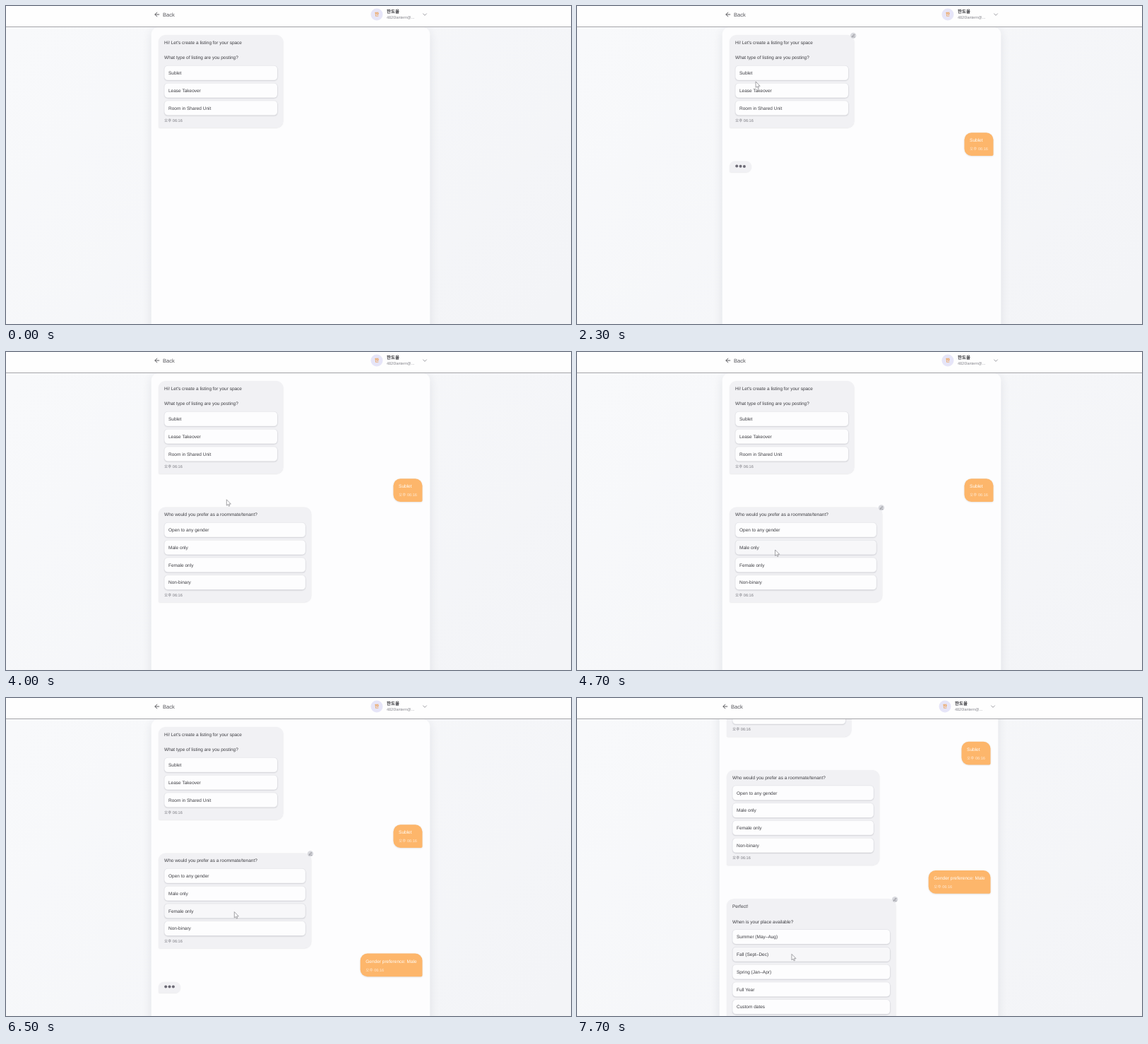
Animation of 800 by 450 pixels, one loop 8 s. Source, as an HTML page with a canvas:

```html
<!DOCTYPE html>
<html lang="en">
<head>
<meta charset="utf-8">
<title>Listing chat</title>
<style>
  html, body { margin: 0; width: 100%; height: 100%; overflow: hidden; background: #f7f8fa; }
  canvas { display: block; }
</style>
</head>
<body>
<canvas id="stage" width="800" height="450"></canvas>
<script>
const ctx = document.getElementById('stage').getContext('2d');
const LOOP = 8000, STEP = 100;
const FONT = '"Liberation Sans", "Noto Sans CJK KR", "Noto Sans CJK", sans-serif';
const STAMP = '오후 06:16';
const OPTION_PITCH = 24.8, OPTION_HEIGHT = 21;
const SCROLL_AT = 6600;

const questions = [
  { from: 0, y: 41, right: 392.5, lines: ["Hi! Let's create a listing for your space", 'What type of listing are you posting?'],
    options: ['Sublet', 'Lease Takeover', 'Room in Shared Unit'] },
  { from: 3800, y: 219.5, right: 432.3, lines: ['Who would you prefer as a roommate/tenant?'],
    options: ['Open to any gender', 'Male only', 'Female only', 'Non-binary'] },
  { from: 6600, y: 401.7, right: 455.5, lines: ['Perfect!', 'When is your place available?'],
    options: ['Summer (May–Aug)', 'Fall (Sept–Dec)', 'Spring (Jan–Apr)', 'Full Year', 'Custom dates'] }
];
for (const q of questions) {
  q.firstOption = q.y + 10.5 + (q.lines.length - 1) * 21.5 + 21.7;
  q.stampY = q.firstOption + (q.options.length - 1) * OPTION_PITCH + 17.6;
  q.bottom = q.stampY + 10.5;
}
const answers = [
  { from: 2100, until: 3800, x: 548.5, y: 179.2, text: 'Sublet' },
  { from: 4900, until: 6600, x: 501.7, y: 361.5, text: 'Gender preference: Male' }
];

// Pointer stops: time, x, y
const pointerPath = [
  [1500, 334.8, 128.8], [1900, 244, 92], [2100, 244, 92], [2900, 302, 190.5], [3400, 312.3, 209.2],
  [4100, 312.3, 209.2], [4500, 283, 286], [4700, 280.6, 280.4], [4900, 280.6, 280.4],
  [5700, 323.3, 303], [6800, 323.3, 303], [7700, 304, 362.8]
];

function pointerAt(t) {
  if (t < pointerPath[0][0]) return null;
  const i = pointerPath.findIndex(p => p[0] > t);
  if (i < 0) return pointerPath[pointerPath.length - 1].slice(1);
  const [t0, x0, y0] = pointerPath[i - 1], [t1, x1, y1] = pointerPath[i];
  const u = (t - t0) / (t1 - t0), k = u * u * (3 - 2 * u);
  return [x0 + (x1 - x0) * k, y0 + (y1 - y0) * k];
}

function text(str, x, middle, size, color, weight = 400, align = 'left') {
  ctx.font = `${weight} ${size}px ${FONT}`;
  ctx.textAlign = align;
  ctx.fillStyle = color;
  ctx.fillText(str, x, middle + size * 0.36);
}

function box(x, y, right, bottom, radii, fill, shadow) {
  ctx.save();
  if (shadow) [ctx.shadowColor, ctx.shadowBlur, ctx.shadowOffsetY] = shadow;
  ctx.beginPath();
  ctx.roundRect(x, y, right - x, bottom - y, radii);
  ctx.fillStyle = fill;
  ctx.fill();
  ctx.restore();
}

function disc(x, y, r, fill) {
  ctx.beginPath();
  ctx.arc(x, y, r, 0, Math.PI * 2);
  ctx.fillStyle = fill;
  ctx.fill();
}

function stroke(path, color, width) {
  ctx.strokeStyle = color;
  ctx.lineWidth = width;
  ctx.lineCap = ctx.lineJoin = 'round';
  ctx.stroke(new Path2D(path));
}

function editBadge(x, y, alpha) {
  ctx.save();
  ctx.globalAlpha = alpha;
  ctx.translate(x, y);
  disc(0, 0, 4.2, '#d9dadf');
  stroke('M-1.8 1.8 L-1.4 .5 L1.1 -2 L2 -1.1 L-.5 1.4 Z M.5 2H2', '#77777e', 0.6);
  ctx.restore();
}

function drawQuestion(q, pointer, t) {
  const inside = (x, y, right, bottom) => pointer &&
    pointer[0] >= x && pointer[0] <= right && pointer[1] >= y && pointer[1] <= bottom;
  box(216, q.y, q.right, q.bottom, [10, 10, 10, 2], '#f1f1f4', ['rgba(30,30,50,.1)', 1.5, 0.5]);
  q.lines.forEach((line, i) => text(line, 224, q.y + 10.5 + i * 21.5, 6.5, '#3d3d42'));
  q.options.forEach((label, i) => {
    const mid = q.firstOption + i * OPTION_PITCH;
    const top = mid - OPTION_HEIGHT / 2, bottom = top + OPTION_HEIGHT, right = q.right - 8;
    const hover = inside(224, top, right, bottom);
    box(224, top, right, bottom, 5, hover ? '#dcdde2' : '#e3e4e8', ['rgba(30,30,50,.16)', 1.5, 0.8]);
    box(224.5, top + 0.5, right - 0.5, bottom - 0.5, 4.5, hover ? '#f7f7f9' : '#fdfdfe');
    text(label, 230, mid, 6.5, '#3d3d42');
  });
  text(STAMP, 224, q.stampY, 5.6, '#7b7b82');
  if (inside(216, q.y, q.right, q.bottom)) editBadge(q.right - 1.3, q.y + 0.9, t < 1600 ? 0.7 : 1);
}

function drawAnswer(a, t) {
  box(a.x, a.y, 589.5, a.y + 32.8, [10, 10, 2, 10], '#fdb66b', ['rgba(60,40,20,.16)', 2, 0.6]);
  text(a.text, a.x + 7.6, a.y + 10.7, 6.5, '#fffdfa');
  text(STAMP, a.x + 7.6, a.y + 23.2, 5.6, 'rgba(255,255,255,.7)');
  if (t >= a.until) return;
  const top = a.y + 40.3;
  box(216, top, 247, top + 15.7, [8, 8, 8, 2], '#f1f1f4', ['rgba(30,30,50,.1)', 1.5, 0.5]);
  for (let i = 0; i < 3; i++) {
    const lift = 0.8 * Math.abs(Math.sin(((t - a.from) / 1000 - i * 0.1) * Math.PI));
    disc(226.2 + i * 5.35, top + 7.4 - lift, 2, '#6c6a75');
  }
}

function drawHeader() {
  ctx.fillStyle = '#fefefe';
  ctx.fillRect(-10, 0, 820, 29);
  ctx.fillStyle = '#a5a5a9';
  ctx.fillRect(-10, 29, 820, 1);
  stroke('M216.8 12H211 M213.8 9.1L210.9 12L213.8 14.9', '#4b4b50', 0.9);
  text('Back', 222, 11.9, 7.6, '#55555b');
  disc(525, 12, 8.5, '#e6e5f8');
  text('한', 525, 12, 6.6, '#ee9d4c', 600, 'center');
  text('한도율', 539, 7.9, 6.5, '#333338', 600);
  text('4820lantern@...', 539, 16.2, 5.5, '#85858c');
  stroke('M590.6 10.9L593 13.3L595.4 10.9', '#85858c', 0.8);
}

function drawPointer([x, y]) {
  ctx.save();
  ctx.translate(x, y);
  const arrow = 'M0 0V8L1.9 6.4L3.2 9.1L4.5 8.5L3.3 5.9H5.7Z';
  ctx.fillStyle = '#fff';
  ctx.fill(new Path2D(arrow));
  stroke(arrow, '#85858a', 0.75);
  ctx.restore();
}

function draw(t) {
  ctx.textRendering = 'geometricPrecision';
  const backdrop = ctx.createLinearGradient(100, -50, 700, 500);
  backdrop.addColorStop(0, '#f8f9fb');
  backdrop.addColorStop(1, '#f3f4f7');
  ctx.fillStyle = backdrop;
  ctx.fillRect(0, 0, 800, 450);

  const scrolled = t >= SCROLL_AT;
  const shiftX = scrolled ? -4 : 0, shiftY = scrolled ? -117.5 : 0;
  const pointer = pointerAt(t);
  // Hover is refreshed one step after the page has scrolled.
  const hoverLag = t < SCROLL_AT + STEP;
  const hoverPoint = pointer && (hoverLag ? pointer : [pointer[0] - shiftX, pointer[1] - shiftY]);

  ctx.save();
  ctx.translate(shiftX, 0);
  ctx.save();
  ctx.translate(0, shiftY);
  box(205.7, 30.5, 600.3, 700, 9, '#fdfdfe', ['rgba(40,45,70,.1)', 14, 4]);
  for (const q of questions) if (t >= q.from) drawQuestion(q, hoverPoint, t);
  for (const a of answers) if (t >= a.from) drawAnswer(a, t);
  ctx.restore();
  drawHeader();
  ctx.restore();
  if (pointer) drawPointer(pointer);
}

const start = performance.now();
function tick() {
  const t = (performance.now() - start) % LOOP;
  draw(Math.floor(t / STEP) * STEP);
  requestAnimationFrame(tick);
}
tick();
</script>
</body>
</html>
```
